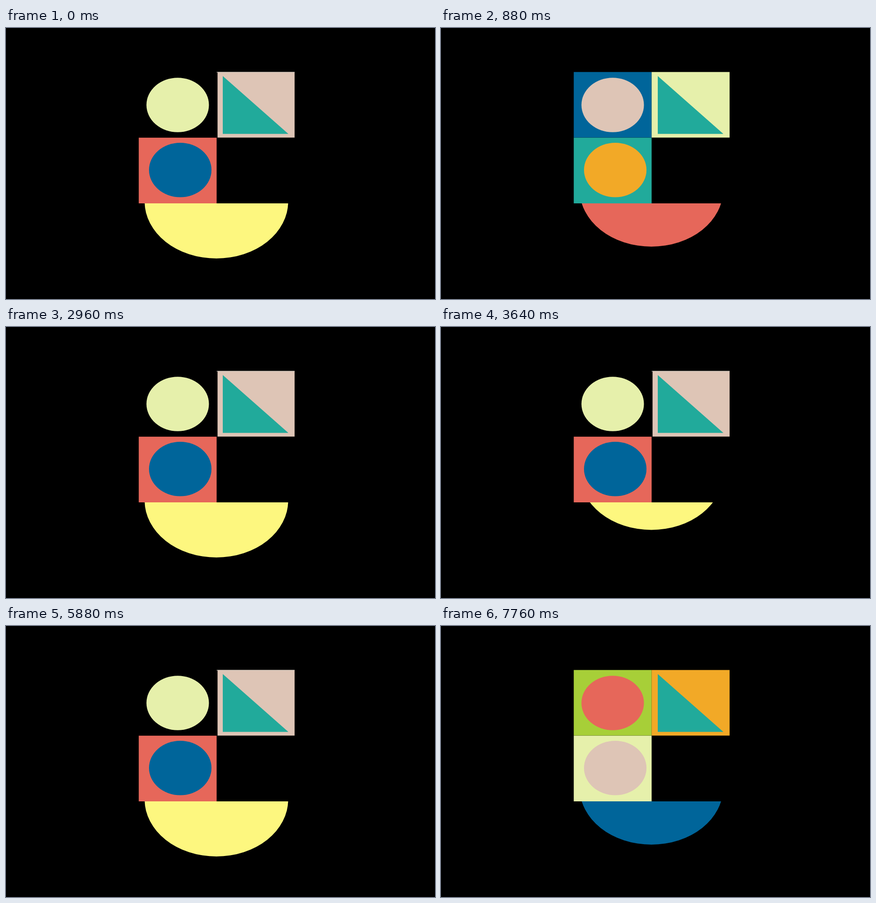
Recreate the animation shown at these times as an HTML page with a canvas. Size 942 by 595 pixels, loop 8.8 s.

```html
<!DOCTYPE html>
<html lang="en">
<head>
<meta charset="utf-8">
<title>Shapes</title>
<style>
  html, body { margin: 0; width: 100%; height: 100%; overflow: hidden; background: #000; }
  canvas { display: block; }
</style>
</head>
<body>
<canvas id="stage" width="942" height="595"></canvas>
<script>
const ctx = document.getElementById('stage').getContext('2d');

const LOOP = 8800, CYCLE = LOOP / 3, STEP = 40;
const RISE_START = CYCLE * 2 / 11, RISE_END = 880, SECOND_CUT = 1880;
const FLOOR_Y = 385, BOWL_LOW = 506, BOWL_REST = 480;

const lime = '#e6f0ab', beige = '#dec5b6', teal = '#21aa9b', red = '#e6675a',
      blue = '#00659a', yellow = '#fdf77f', orange = '#f2a927', green = '#a7cf38';

const schemes = [
  { tile1: '#000', disc1: lime, tile2: beige, tile3: red, disc2: blue, bowl: yellow, inset: 2 },
  { tile1: blue, disc1: beige, tile2: lime, tile3: teal, disc2: orange, bowl: red, inset: 0 },
  { tile1: green, disc1: red, tile2: orange, tile3: lime, disc2: beige, bowl: blue, inset: 0 }
];

const easeInOut = t => t < 0.5 ? 2 * t * t : 1 - 2 * (1 - t) * (1 - t);

function rect(x, y, w, h, color) {
  ctx.fillStyle = color;
  ctx.fillRect(x, y, w, h);
}

function ellipse(x, y, rx, ry, color) {
  ctx.fillStyle = color;
  ctx.beginPath();
  ctx.ellipse(x, y, rx, ry, 0, 0, Math.PI * 2);
  ctx.fill();
}

function triangle(color) {
  ctx.fillStyle = color;
  ctx.beginPath();
  ctx.moveTo(476, 105.5);
  ctx.lineTo(620, 232.5);
  ctx.lineTo(476, 232.5);
  ctx.fill();
}

function bowl(bottom, color) {
  ctx.save();
  ctx.beginPath();
  ctx.rect(0, FLOOR_Y, 942, 595 - FLOOR_Y);
  ctx.clip();
  ellipse(462, bottom - 125, 157.6, 125, color);
  ctx.restore();
}

function bowlBottom(phase) {
  if (phase >= RISE_END) return BOWL_REST;
  const t = Math.max(0, (phase - RISE_START) / (RISE_END - RISE_START));
  return BOWL_LOW + (FLOOR_Y - BOWL_LOW) * easeInOut(t);
}

function draw(ms) {
  const time = Math.floor((ms % LOOP) / STEP) * STEP;
  const phase = time % CYCLE;
  const s = schemes[phase < RISE_END ? 0 : phase < SECOND_CUT ? 1 : 2];

  rect(0, 0, 942, 595, '#000');
  rect(291.5, 96.6, 171, 144, s.tile1);
  rect(462.5 + s.inset, 96.6, 171.2 - s.inset, 144, s.tile2);
  if (s.inset) rect(462.5, 96.6, 171.2, 1, '#d5d0c5');
  rect(291.5, 240.8, 171, 144.2, s.tile3);
  ellipse(377, 169, 68.6, 59.8, s.disc1);
  ellipse(382.6, 311.7, 68.6, 59.8, s.disc2);
  triangle(teal);
  bowl(bowlBottom(phase), s.bowl);
}

const start = performance.now();
function tick() {
  draw(performance.now() - start);
  requestAnimationFrame(tick);
}
tick();
</script>
</body>
</html>
```
